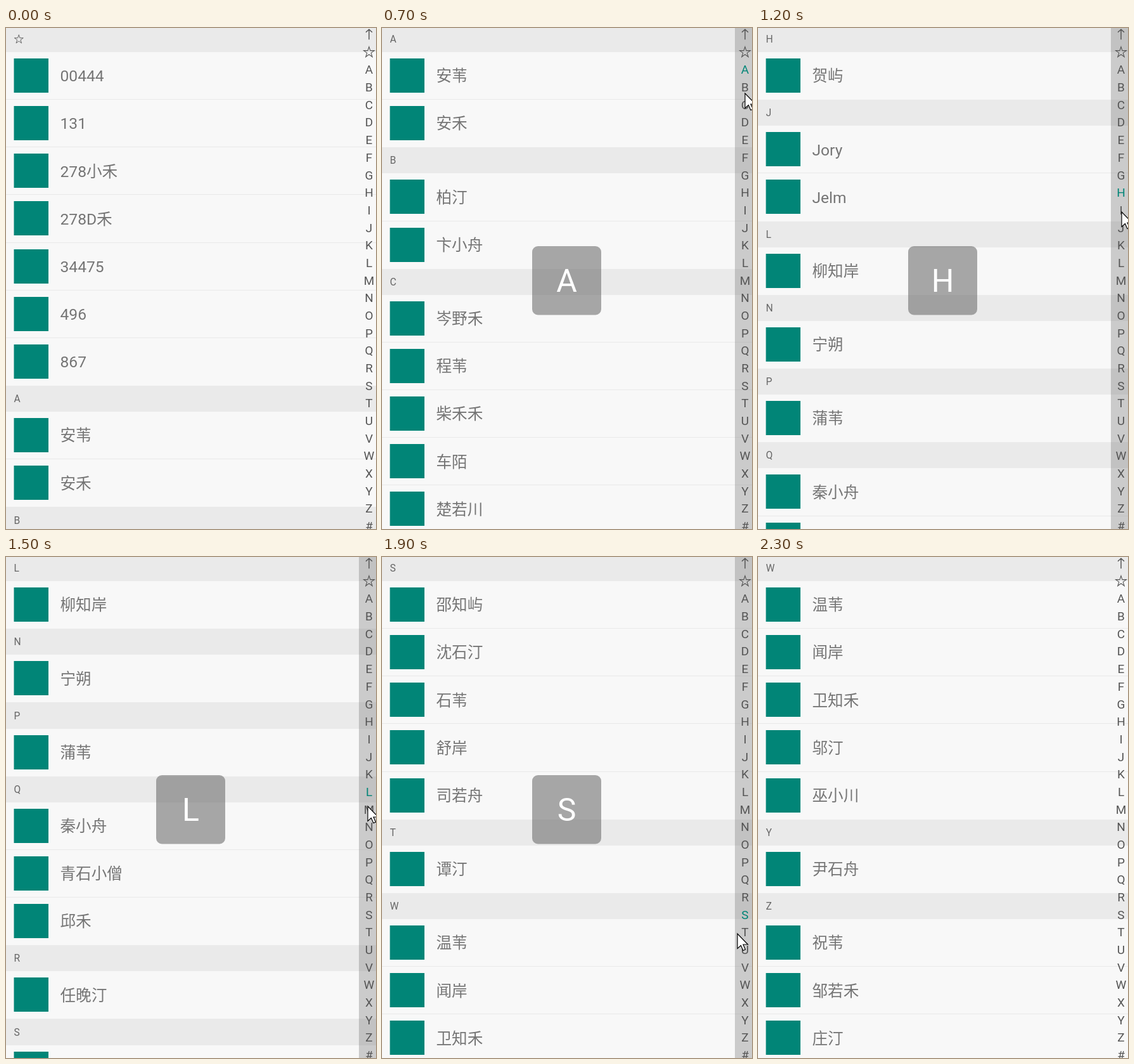
These frames come from a looping animation (584x790 px, 3500 ms). An HTML page with a canvas:

```html
<!DOCTYPE html>
<html lang="zh-CN">
<head>
<meta charset="utf-8">
<title>Contact index</title>
<style>
html, body { margin: 0; width: 584px; height: 790px; overflow: hidden; background: #f8f8f8; }
canvas { display: block; }
</style>
</head>
<body>
<canvas id="stage" width="584" height="790"></canvas>
<script>
const ctx = document.getElementById('stage').getContext('2d');
const W = 584, H = 790, LOOP = 3500, STEP = 100;
const PRESS = 500, RELEASE = 2200, CURSOR_IN = 200, CURSOR_OUT = 2300;
const ROW = 75.15, HEAD = 41.1, TOP = -3.1;
const TEAL = '#018577', INK = '#555';
const FONT = 'Roboto, "Noto Sans CJK SC", "Noto Sans CJK", sans-serif';
const INDEX = '↑☆ABCDEFGHIJKLMNOPQRSTUVWXYZ#';
// Letter under the finger at each step of the drag
const TOUCHED = '☆AABCEFHIKLNPQSUW';

const sections = Object.entries({
  '☆': '00444 131 278小禾 278D禾 34475 496 867',
  A: '安苇 安禾',
  B: '柏汀 卞小舟',
  C: '岑野禾 程苇 柴禾禾 车陌 楚若川',
  D: '冬日纸船',
  G: '葛屿 顾汀 关月苓',
  H: '贺屿',
  J: 'Jory Jelm',
  L: '柳知岸',
  N: '宁朔',
  P: '蒲苇',
  Q: '秦小舟 青石小僧 邱禾',
  R: '任晚汀',
  S: '邵知屿 沈石汀 石苇 舒岸 司若舟',
  T: '谭汀',
  W: '温苇 闻岸 卫知禾 邬汀 巫小川',
  Y: '尹石舟',
  Z: '祝苇 邹若禾 庄汀 钟岸'
}).map(([key, names]) => ({ key, names: names.split(' ') }));

// Pointer path: time, x, y
const PATH = [
  [200, 577, 39], [300, 570, 44], [500, 570, 44], [900, 576, 162],
  [1200, 574, 290], [1500, 571, 393], [1900, 561, 594], [2200, 580, 664]
];

function pointerAt(t) {
  const i = Math.max(1, PATH.findIndex(p => p[0] >= t));
  const [a, b] = [PATH[i - 1], PATH[i]];
  const k = (t - a[0]) / (b[0] - a[0]);
  return [a[1] + (b[1] - a[1]) * k, a[2] + (b[2] - a[2]) * k];
}

function box(x, y, w, h, color) {
  ctx.fillStyle = color;
  ctx.fillRect(x, y, w, h);
}

function label(text, x, y, size, color, align = 'left') {
  ctx.font = `${size}px ${FONT}`;
  ctx.textAlign = align;
  ctx.fillStyle = color;
  // y is the middle of the capitals
  ctx.fillText(text, x, y + size * 0.356);
}

function star(x, y, r, color, width) {
  ctx.beginPath();
  for (let i = 0; i < 10; i++) {
    const a = i * Math.PI / 5, d = i % 2 ? r * 0.382 : r;
    ctx.lineTo(x + d * Math.sin(a), y - d * Math.cos(a));
  }
  ctx.closePath();
  ctx.strokeStyle = color;
  ctx.lineWidth = width;
  ctx.stroke();
}

function arrow(x, y) {
  ctx.beginPath();
  ctx.moveTo(x, y + 8);
  ctx.lineTo(x, y - 8);
  ctx.moveTo(x - 5, y - 3.5);
  ctx.lineTo(x, y - 8);
  ctx.lineTo(x + 5, y - 3.5);
  ctx.strokeStyle = INK;
  ctx.lineWidth = 1.5;
  ctx.stroke();
}

function drawList(touched) {
  const order = key => INDEX.indexOf(key);
  let y = TOP;
  for (const { key, names } of sections.slice(
    sections.findLastIndex(s => order(s.key) <= order(touched)))) {
    if (y > H) return;
    box(0, Math.round(y), W, Math.round(y + HEAD) - Math.round(y), '#eaeaea');
    const mid = y + HEAD / 2;
    if (key === '☆') star(20.3, mid + 0.5, 7.3, '#666', 1);
    else label(key, 12.6, mid, 15.6, '#666');
    y += HEAD;
    names.forEach((name, i) => {
      box(12.5, Math.round(y + 10), 54.5, 54, TEAL);
      label(name, 85.5, y + ROW / 2, 24.6, '#757575');
      y += ROW;
      if (i < names.length - 1) box(0, Math.round(y) - 1, W, 1, '#e9e9e9');
    });
  }
}

function drawIndex(active) {
  [...INDEX].forEach((ch, i) => {
    const y = 10.3 + i * 27.68, color = ch === active ? TEAL : INK;
    if (ch === '↑') arrow(573, y);
    else if (ch === '☆') star(573, y + 0.4, 8.8, color, 1.1);
    else label(ch, 573, y, 19, color, 'center');
  });
}

function drawPopup(ch) {
  ctx.beginPath();
  ctx.roundRect(237, 344, 109, 108.5, 9);
  ctx.fillStyle = 'rgba(100,100,100,.55)';
  ctx.fill();
  if (ch === '☆') star(291.5, 399.5, 22.6, '#fff', 2.2);
  else label(ch, 291.5, 398, 50, '#fff', 'center');
}

function drawPointer(x, y) {
  ctx.beginPath();
  for (const [dx, dy] of [[0, 0], [0, 23.5], [5.4, 18.5], [9, 26.5], [12.5, 25], [9, 17], [16.5, 17]])
    ctx.lineTo(x + dx, y + dy);
  ctx.closePath();
  ctx.fillStyle = '#fff';
  ctx.fill();
  ctx.strokeStyle = '#000';
  ctx.lineWidth = 1.2;
  ctx.stroke();
}

function frame(now) {
  const t = Math.floor(now % LOOP / STEP) * STEP;
  const pressed = t >= PRESS && t < RELEASE;
  const step = Math.max(0, Math.min(TOUCHED.length - 1, (t - PRESS) / STEP));
  const touched = TOUCHED[step];

  box(0, 0, W, H, '#f8f8f8');
  drawList(touched);
  if (pressed) box(557, 0, 27, H, 'rgba(128,128,128,.38)');
  drawIndex(pressed ? touched : '');
  if (pressed) drawPopup(touched);
  if (t >= CURSOR_IN && t < CURSOR_OUT) drawPointer(...pointerAt(t));
  requestAnimationFrame(frame);
}

frame(performance.now());
</script>
</body>
</html>
```
